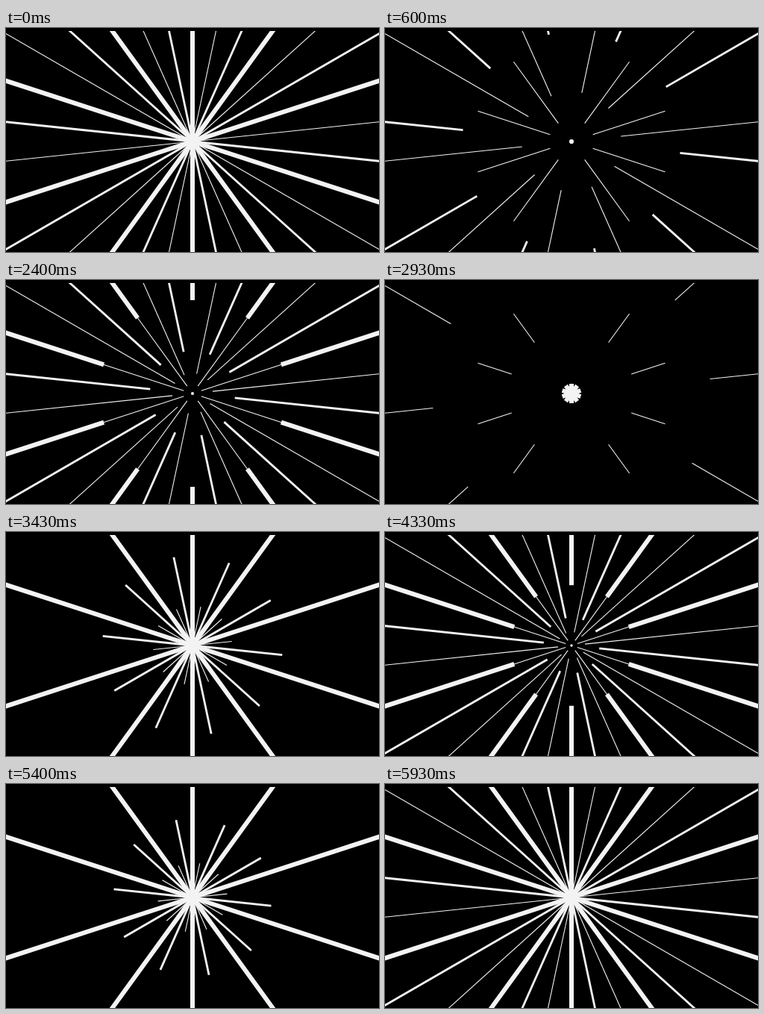
Animation of 500 by 300 pixels, one loop 6010 ms. Source, as an HTML page with a canvas:

```html
<!DOCTYPE html>
<html lang="en">
<head>
<meta charset="utf-8">
<title>Starburst</title>
<style>
  html, body { margin: 0; width: 100%; height: 100%; overflow: hidden; background: #000; }
  canvas { display: block; }
</style>
</head>
<body>
<canvas id="stage" width="500" height="300"></canvas>
<script>
const ctx = document.getElementById('stage').getContext('2d');
const LOOP = 6010, CYCLE = 2000, HOLD = 200, LAST = 5930;
const RAYS = 30, LENGTH = 292, INNER_LENGTH = 132;

// Clockwise from the top the rays repeat as thick, thin, medium.
const KINDS = [
  { width: 6, duration: 670, power: 2.9, enter: 701 },
  { width: 1.1, duration: 1218, power: 2.67, enter: 787 },
  { width: 2.8, duration: 896, power: 2.8, enter: 776 }
];
const [THICK, THIN] = KINDS;
const EXIT = -100;

const progress = (kind, elapsed) =>
  Math.min(1, Math.max(0, elapsed / kind.duration) ** kind.power);

function ray(angle, from, to, width) {
  if (to <= from) return;
  const x = Math.sin(angle), y = -Math.cos(angle);
  ctx.lineWidth = width;
  ctx.beginPath();
  ctx.moveTo(x * from, y * from);
  ctx.lineTo(x * to, y * to);
  ctx.stroke();
}

function draw(time) {
  const phase = time % CYCLE;
  const resting = phase < HOLD || time >= LAST;

  ctx.fillStyle = '#000';
  ctx.fillRect(0, 0, 500, 300);
  ctx.save();
  ctx.beginPath();
  ctx.rect(0, 4, 500, 296);
  ctx.clip();
  ctx.translate(250, 152);
  ctx.fillStyle = ctx.strokeStyle = '#f3f3f3';

  for (let i = 0; i < RAYS; i++) {
    const kind = KINDS[i % 3];
    const angle = i * 2 * Math.PI / RAYS;
    if (resting) {
      ray(angle, 0, LENGTH, kind.width);
      continue;
    }
    ray(angle, LENGTH * progress(kind, phase - EXIT), LENGTH, kind.width);
    ray(angle, 0, LENGTH * progress(kind, phase - kind.enter), kind.width);
    // A short thin ray lies under every thick one except the vertical pair.
    if (kind === THICK && i % (RAYS / 2)) {
      ray(angle, INNER_LENGTH * progress(THIN, phase - EXIT), INNER_LENGTH, THIN.width);
    }
  }

  if (!resting) {
    ctx.beginPath();
    ctx.arc(0, 0, Math.min(3.2, phase / 195), 0, 2 * Math.PI);
    ctx.fill();
  }
  ctx.restore();
}

// The picture advances twice per 100 ms, after 30 and 70 ms.
const stepped = t => Math.floor(t / 100) * 100 + (t % 100 >= 30 ? 30 : 0);

const start = performance.now();
function tick() {
  draw(stepped((performance.now() - start) % LOOP));
  requestAnimationFrame(tick);
}
tick();
</script>
</body>
</html>
```
